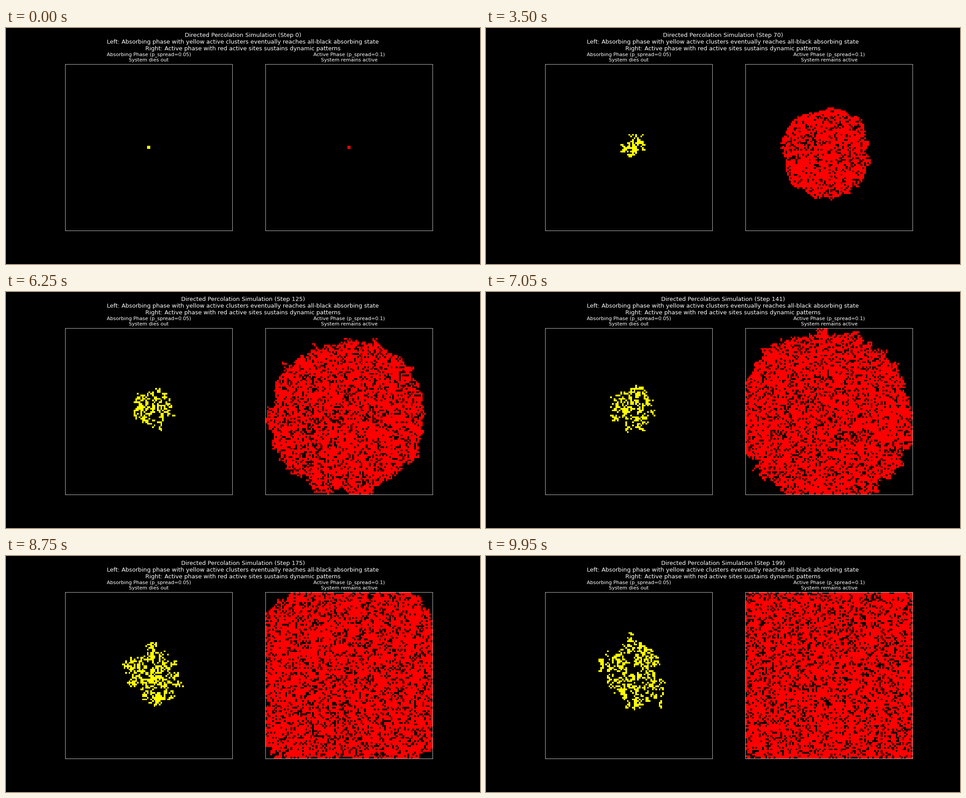
Recreate the animation shown at these times as a matplotlib script. Size 1058 px wide and 529 px high, loop 10 s.

```python
import numpy as np
import matplotlib.pyplot as plt
from matplotlib.animation import FuncAnimation
from matplotlib.colors import ListedColormap

SIZE, STEPS = 100, 200
ROWS, COLS = np.mgrid[:SIZE, :SIZE] + 0.5


def block_sum(grid):
    """Sum over each cell and its eight neighbours."""
    padded = np.pad(grid, 1)
    return sum(padded[i:i + SIZE, j:j + SIZE] for i in range(3) for j in range(3))


def smooth_noise(rng):
    noise = rng.normal(size=(SIZE, SIZE))
    for _ in range(3):
        noise = block_sum(noise)
    return noise / noise.std()


def front_level(step, growth, drift):
    """Distance relative to a growing ellipse; below 1 is inside."""
    settled = min(step / 70, 1)
    u = (COLS - SIZE / 2 - drift[0] * settled) / (1 + growth[0] * step)
    v = (ROWS - SIZE / 2 - drift[1] * settled) / (1 + growth[1] * step)
    return np.hypot(u, v)


def simulate(p_spread, p_death, density, growth, drift, roughness, seed):
    rng = np.random.default_rng(seed)
    jitter = roughness * smooth_noise(rng)
    grid = np.zeros((SIZE, SIZE), int)
    grid[49:51, 49:51] = 1
    history = [grid]
    was_inside = grid > 0
    for step in range(1, STEPS):
        inside = front_level(step, growth, drift) + jitter < 1
        neighbours = block_sum(grid) - grid
        birth = 1 - (1 - p_spread) ** neighbours
        birth[inside & ~was_inside & (neighbours > 0)] = density
        # Crowding raises the death rate and keeps the cluster near its density.
        crowding = grid.sum() / max(inside.sum(), 1) / density
        death = min(p_death * crowding ** 4, 0.4)
        chance = np.where(grid > 0, 1 - death, birth * inside)
        new = (rng.random((SIZE, SIZE)) < chance).astype(int)
        if new.any():
            grid = new
        was_inside = inside
        history.append(grid)
    return history


weak = simulate(0.05, 0.2, 0.31, growth=(0.095, 0.11), drift=(2.5, -2),
                roughness=0.13, seed=7)
strong = simulate(0.1, 0.14, 0.77, growth=(0.37, 0.37), drift=(-1.5, 3.5),
                  roughness=0.04, seed=11)

plt.style.use("dark_background")
plt.rcParams["font.family"] = "DejaVu Sans"
fig, axes = plt.subplots(1, 2, figsize=(16, 8), dpi=66.125)
fig.set_facecolor("black")
fig.subplots_adjust(bottom=0.1095)


def panel(ax, grid, color, *title):
    for line, rise in zip(title, (19.3, 5.5)):
        ax.annotate(line, (0.5, 1), xytext=(0, rise), xycoords="axes fraction",
                    textcoords="offset pixels", ha="center", va="baseline",
                    fontsize=12, color="white")
    ax.set_xticks([])
    ax.set_yticks([])
    return ax.imshow(grid, cmap=ListedColormap(["black", color]),
                     vmin=0, vmax=1, interpolation="nearest")


weak_image = panel(axes[0], weak[0], "yellow",
                   "Absorbing Phase (p_spread=0.05)", "System dies out")
strong_image = panel(axes[1], strong[0], "red",
                     "Active Phase (p_spread=0.1)", "System remains active")
heading = fig.suptitle("", y=0.982, fontsize=14, color="white")


def update(step):
    weak_image.set_data(weak[step])
    strong_image.set_data(strong[step])
    heading.set_text(
        f"Directed Percolation Simulation (Step {step})\n"
        "Left: Absorbing phase with yellow active clusters eventually "
        "reaches all-black absorbing state\n"
        "Right: Active phase with red active sites sustains dynamic patterns")
    return weak_image, strong_image, heading


anim = FuncAnimation(fig, update, frames=STEPS, interval=50, repeat=True,
                     repeat_delay=0, blit=False)
plt.show()
```
